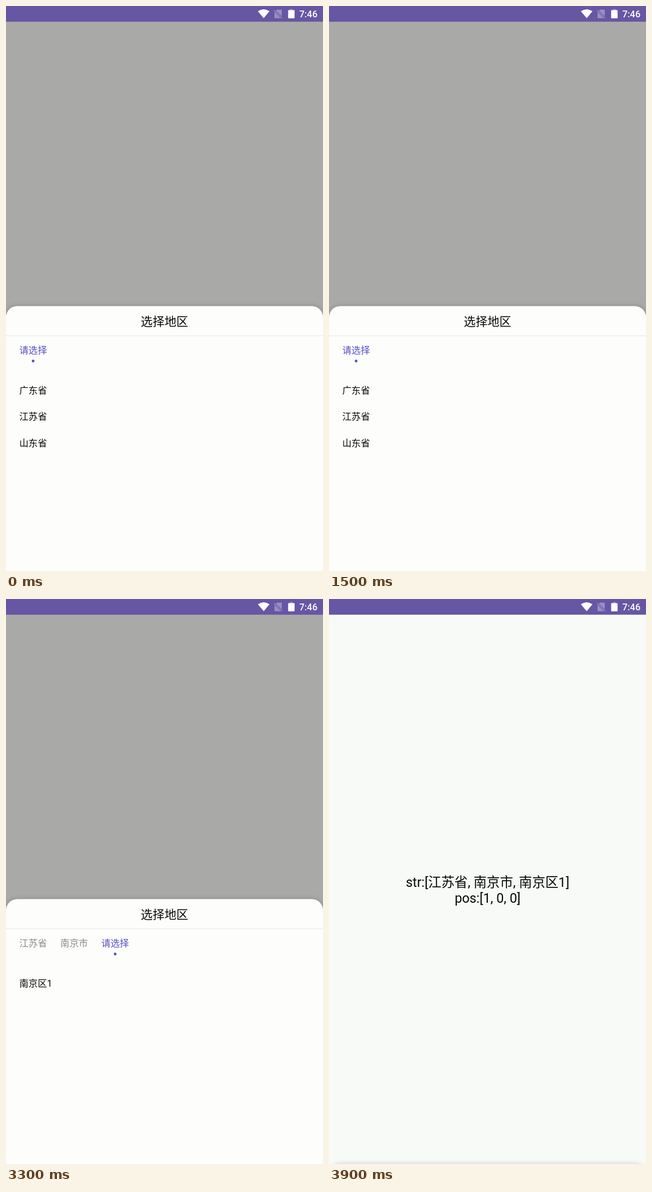
These frames come from a looping animation (561 px wide and 997 px high, 4 s). An HTML page:

```html
<!DOCTYPE html>
<html lang="zh-CN">
<head>
<meta charset="utf-8">
<title>选择地区</title>
<style>
  html, body { margin: 0; width: 100%; height: 100%; overflow: hidden; }
  svg { display: block; width: 100%; height: 100%; }
  text { font-family: Roboto, "Noto Sans CJK SC", "Noto Sans CJK", sans-serif; font-size: 16.33px; fill: #060606; }
  .mid { text-anchor: middle; }
  .title { font-size: 21px; }
  .result { font-size: 23.33px; }
  .clock { font-weight: 500; fill: #fff; }
  #tabs text { fill: #88898b; }
  #tabs .active, #dot { fill: #584dc4; }
  #panel { filter: drop-shadow(0 0 4px rgba(0, 0, 0, .2)); }
</style>
</head>
<body>
<svg viewBox="0 0 561 997">
  <rect width="561" height="997" fill="#f8faf7"/>
  <g id="result" class="mid">
    <text class="result" x="280.7" y="508">str:[江苏省, 南京市, 南京区1]</text>
    <text class="result" x="280.7" y="535.5">pos:[1, 0, 0]</text>
  </g>
  <rect id="dim" width="561" height="997"/>

  <g id="sheet">
    <path id="panel" d="M0 1010V549.5a20 20 0 0 1 20-20H541a20 20 0 0 1 20 20V1010z" fill="#fdfefc"/>
    <text class="mid title" x="280.5" y="564">选择地区</text>
    <rect y="581.5" width="561" height="1" fill="#e6e7e6"/>
    <g id="tabs"></g>
    <circle id="dot" cy="626.5" r="2.4"/>
    <g id="items"></g>
  </g>

  <rect width="561" height="27.7" fill="#6656a4"/>
  <path d="M445.7 9.2Q456 2.2 466.3 9.2L456 21.6z" fill="#fff"/>
  <g fill="#9a8fc3">
    <path d="M479.5 6.5H488V18.2L477.6 8.2zM475.2 10.6L486.4 21.6H475.2z"/>
    <path d="M474.3 7.4L488.8 21.6" stroke="#9a8fc3" stroke-width="1.4"/>
    <rect x="502.3" y="5.4" width="5.4" height="2.2"/>
  </g>
  <rect x="499.3" y="7.2" width="11.4" height="14.6" rx="1" fill="#fff"/>
  <text class="clock" x="519" y="20">7:46</text>
</svg>
<script>
const LOOP = 4000, TICK = 100;
const CLOSE = 3500, SLIDE = 272, FADE = 345;
const TRAVEL = 467.5, DIM = 0.322;
const LEFT = 23.5, TAB_STEP = 72.6, ROW_STEP = 46.8;

const steps = [
  { from: 0, tabs: ['请选择'], items: ['广东省', '江苏省', '山东省'] },
  { from: 1700, tabs: ['江苏省', '请选择'], items: ['南京市', '无锡市'] },
  { from: 2500, tabs: ['江苏省', '南京市', '请选择'], items: ['南京区1'] },
];

const $ = id => document.getElementById(id);
const label = (x, y, text, cls = '') => `<text x="${x}" y="${y}" class="${cls}">${text}</text>`;
const progress = (t, span) => Math.min(1, Math.max(0, (t - CLOSE) / span));

let shown;

function showStep(step) {
  if (step === shown) return;
  shown = step;
  const last = step.tabs.length - 1;
  $('tabs').innerHTML = step.tabs
    .map((name, i) => label(LEFT + i * TAB_STEP, 612.7, name, i === last ? 'active' : '')).join('');
  $('items').innerHTML = step.items
    .map((name, i) => label(LEFT, 683.5 + i * ROW_STEP, name)).join('');
  $('dot').setAttribute('cx', 48 + last * TAB_STEP);
}

function draw(t) {
  showStep(steps.findLast(s => t >= s.from));
  const slide = 1 - (1 - progress(t, SLIDE)) ** 5;
  $('sheet').setAttribute('transform', `translate(0 ${slide * TRAVEL})`);
  $('dim').setAttribute('opacity', DIM * (1 - progress(t, FADE)));
  $('result').setAttribute('visibility', t > CLOSE ? 'visible' : 'hidden');
}

const start = performance.now();
function loop() {
  const t = (performance.now() - start) % LOOP;
  draw(Math.floor(t / TICK) * TICK);
  requestAnimationFrame(loop);
}
loop();
</script>
</body>
</html>
```
